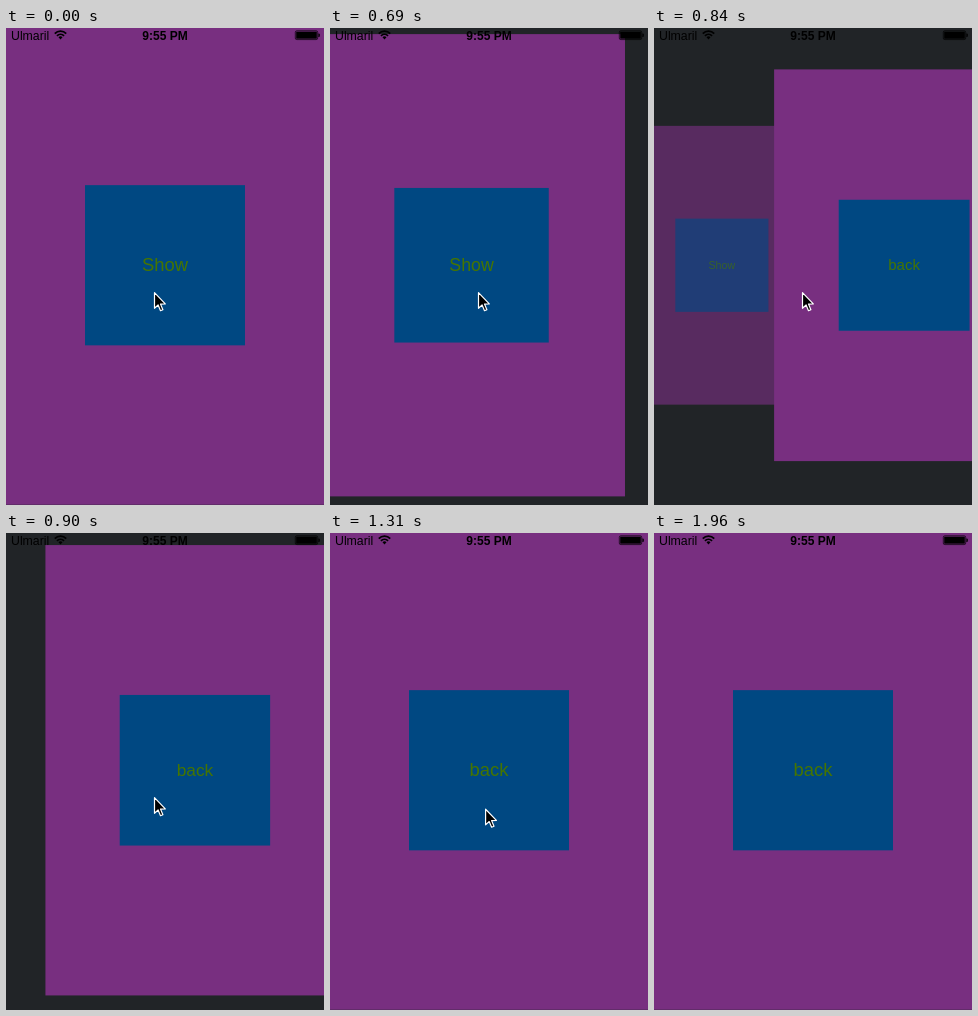
Write an HTML page with a canvas that moves like this. It is 318 px wide and 477 px high and loops after 2.01 s.

```html
<!DOCTYPE html>
<html lang="en">
<head>
<meta charset="utf-8">
<title>Swap transition</title>
<style>
  html, body { margin: 0; width: 100%; height: 100%; overflow: hidden; background: #212427; }
  canvas { display: block; width: 318px; height: 477px; }
</style>
</head>
<body>
<canvas id="stage"></canvas>
<script>
const WIDTH = 318, HEIGHT = 477, LOOP = 2010;
const PURPLE = '#782f80', BLUE = '#004882', GREEN = '#457500', DARK = '#212427';
const FONT = '"Liberation Sans", Arial, sans-serif';
const CENTER_X = 159, CENTER_Y = 237.25;

// The picture is refreshed only at these moments (ms).
const TICKS = [0, 660, 690, 780, 840, 900, 950, 1040,
               1310, 1340, 1375, 1410, 1440, 1475, 1510];
const SWAP_START = 628.5, HALF_SWAP = 176;
const SWAY = 143, NEAR = 1, MIDDLE = 0.714, FAR = 0.35;
const MOUSE_START = 1285, MOUSE_END = 1475, MOUSE_GONE = 1510;

const canvas = document.getElementById('stage');
const ctx = canvas.getContext('2d');
const density = window.devicePixelRatio || 1;
canvas.width = WIDTH * density;
canvas.height = HEIGHT * density;

const clamp = v => Math.min(1, Math.max(0, v));
const mix = (a, b, p) => a + (b - a) * p;
const easeIn = u => u * u;
const easeOut = u => 1 - (1 - u) ** 2;

function drawText(text, x, y, size, color, align = 'left', weight = 400) {
  ctx.font = `${weight} ${size}px ${FONT}`;
  ctx.textAlign = align;
  ctx.fillStyle = color;
  ctx.fillText(text, x, y);
}

function drawScreen(label, shift, scale, alpha) {
  ctx.save();
  ctx.globalAlpha = alpha;
  ctx.translate(CENTER_X + shift, CENTER_Y);
  ctx.scale(scale, scale);
  ctx.fillStyle = PURPLE;
  ctx.fillRect(-159, -239.5, 318, 479);
  ctx.fillStyle = BLUE;
  ctx.fillRect(-80, -80.1, 160, 160.2);
  drawText(label, 0, 6.1, 18.4, GREEN, 'center');
  ctx.restore();
}

function drawSwap(t) {
  const apart = easeIn(clamp((t - SWAP_START) / HALF_SWAP));
  const joined = easeOut(clamp((t - SWAP_START - HALF_SWAP) / HALF_SWAP));
  if (joined === 0) {
    drawScreen('back', SWAY * apart, mix(FAR, MIDDLE, apart), apart);
    drawScreen('Show', -SWAY * apart, mix(NEAR, MIDDLE, apart), 1);
  } else {
    const shift = SWAY * (1 - joined);
    drawScreen('Show', -shift, mix(MIDDLE, FAR, joined), 1 - joined);
    drawScreen('back', shift, mix(MIDDLE, NEAR, joined), 1);
  }
}

function drawStatusBar() {
  drawText('Ulmaril', 5, 11.6, 12.3, '#000');
  drawText('9:55 PM', 159, 11.6, 12, '#000', 'center', 700);

  ctx.strokeStyle = ctx.fillStyle = '#000';
  ctx.lineWidth = 1.8;
  for (const radius of [5, 8.1]) {
    ctx.beginPath();
    ctx.arc(54.5, 11.3, radius, -Math.PI * 0.75, -Math.PI * 0.25);
    ctx.stroke();
  }
  ctx.beginPath();
  ctx.moveTo(54.5, 11.6);
  ctx.arc(54.5, 11.3, 2.8, -Math.PI * 0.75, -Math.PI * 0.25);
  ctx.fill();

  ctx.lineWidth = 0.7;
  ctx.beginPath();
  ctx.roundRect(289.3, 2.8, 22.4, 8.8, 1.5);
  ctx.stroke();
  ctx.fillRect(290.2, 3.7, 20.6, 7);
  ctx.beginPath();
  ctx.roundRect(312.4, 5.5, 1.4, 3.4, [0, 1, 1, 0]);
  ctx.fill();
}

function drawPointer(t) {
  if (t >= MOUSE_GONE) return;
  const p = clamp((t - MOUSE_START) / (MOUSE_END - MOUSE_START)) ** 1.4;
  const outline = [[0, 0], [0, 15.6], [3.6, 12.3], [6, 18], [8.4, 17], [6, 11.4], [10.8, 11.2]];
  ctx.save();
  ctx.translate(mix(148.5, 270, p), mix(264.7, 462, p));
  ctx.beginPath();
  outline.forEach(([x, y]) => ctx.lineTo(x, y));
  ctx.closePath();
  ctx.fillStyle = '#000';
  ctx.fill();
  ctx.strokeStyle = '#fff';
  ctx.lineWidth = 1.2;
  ctx.lineJoin = 'round';
  ctx.stroke();
  ctx.restore();
}

function render(time) {
  const t = TICKS.findLast(tick => tick <= time);
  ctx.setTransform(density, 0, 0, density, 0, 0);
  ctx.fillStyle = DARK;
  ctx.fillRect(0, 0, WIDTH, HEIGHT);
  drawSwap(t);
  drawStatusBar();
  drawPointer(t);
}

const start = performance.now();
function loop() {
  render((performance.now() - start) % LOOP);
  requestAnimationFrame(loop);
}
loop();
</script>
</body>
</html>
```
